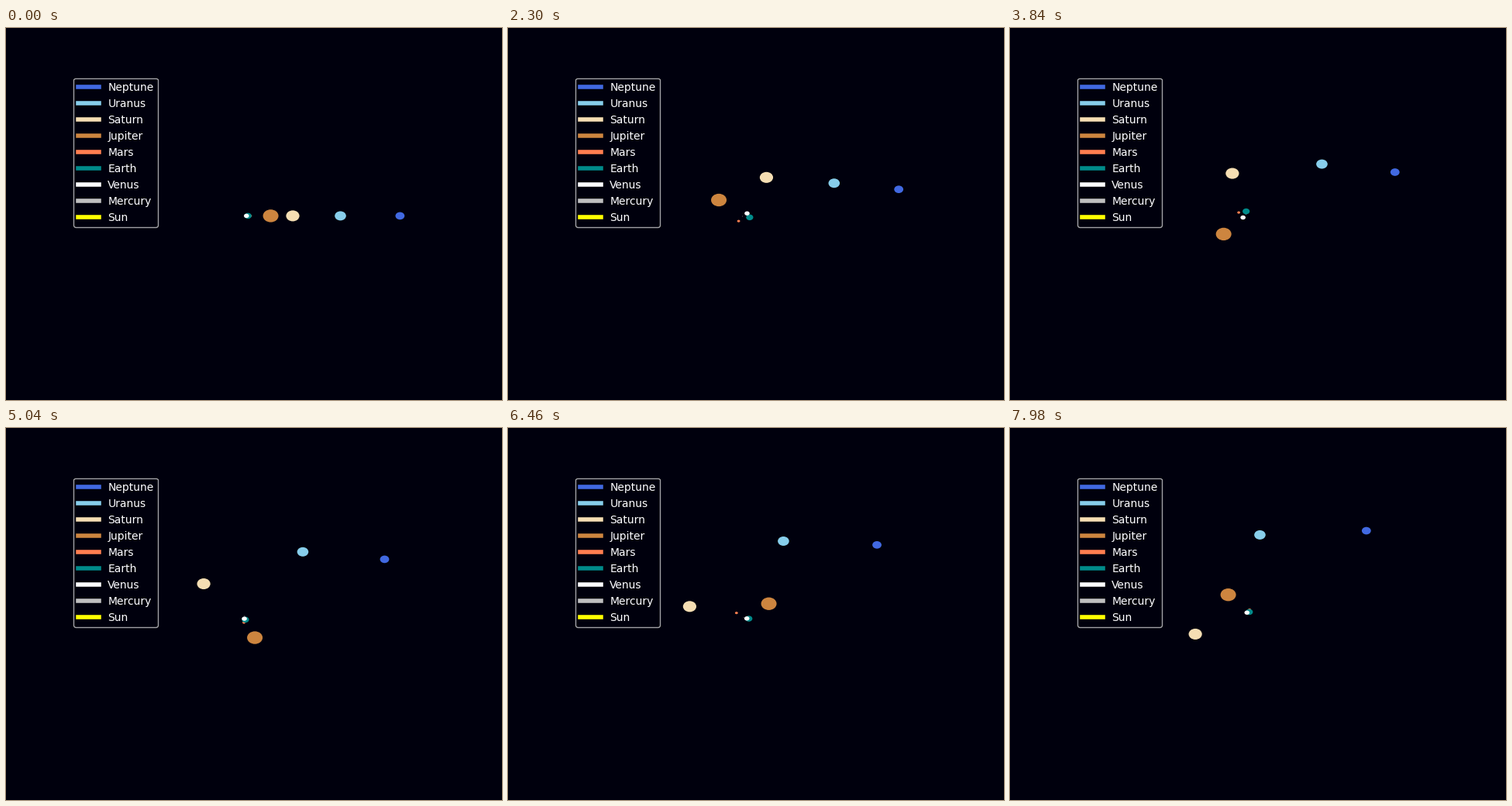
Write a matplotlib script that moves like this. It is 640x480 px and loops after 8000 ms.

```python
import math

import matplotlib.pyplot as plt
from matplotlib.animation import FuncAnimation
from matplotlib.lines import Line2D
from matplotlib.patches import Ellipse

FRAMES, INTERVAL = 400, 20
SKY = "#00000d"
SUN = (305.1, 242.4)
FLATTEN = 1 / 1.222   # vertical scale relative to horizontal

# name, colour, drawn width, semi-major axis (px), eccentricity, degrees per step
PLANETS = [
    ("Neptune", "royalblue", 11.8, 210.0, 0.032, 0.0967),
    ("Uranus", "skyblue", 14.6, 129.3, 0.0224, 0.1998),
    ("Saturn", "wheat", 17.2, 68.6, 0.054, 0.5166),
    ("Jupiter", "peru", 20.0, 39.25, 0.071, 1.199),
    ("Mars", "coral", 3.8, 10.8, 0.05, 8.277),
    ("Earth", "darkcyan", 9.2, 7.15, 0.0, 15.486),
    ("Venus", "white", 6.6, 5.15, 0.0, 25.47),
    ("Mercury", "silver", 0.9, 2.75, 0.0, 64.3),
]


def position(step, a, e, rate):
    """Point on a Kepler orbit with the sun in one focus."""
    mean = math.radians(rate * step)
    angle = mean
    for _ in range(8):
        angle = mean + e * math.sin(angle)
    x = a * (math.cos(angle) - e)
    y = a * math.sqrt(1 - e * e) * math.sin(angle)
    return SUN[0] + x, SUN[1] - y * FLATTEN


fig, ax = plt.subplots(figsize=(6.4, 4.8), dpi=100, facecolor=SKY)
ax.set_xlim(80, 576)
ax.set_ylim(427.2, 57.6)
ax.set_axis_off()

discs = []
for depth, (name, color, width, *orbit) in enumerate(PLANETS):
    disc = Ellipse(position(0, *orbit), width, width * FLATTEN,
                   facecolor=color, linewidth=0, zorder=2 + 0.1 * depth)
    discs.append(ax.add_patch(disc))

entries = [(name, color) for name, color, *_ in PLANETS] + [("Sun", "yellow")]
ax.legend([Line2D([], [], color=color, lw=4) for _, color in entries],
          [name for name, _ in entries],
          loc="upper left", labelcolor="white", facecolor=SKY)


def update(step):
    for disc, (_, _, _, *orbit) in zip(discs, PLANETS):
        disc.set_center(position(step, *orbit))
    return discs


anim = FuncAnimation(fig, update, frames=FRAMES, interval=INTERVAL,
                     repeat=True, repeat_delay=0)
plt.show()
```
